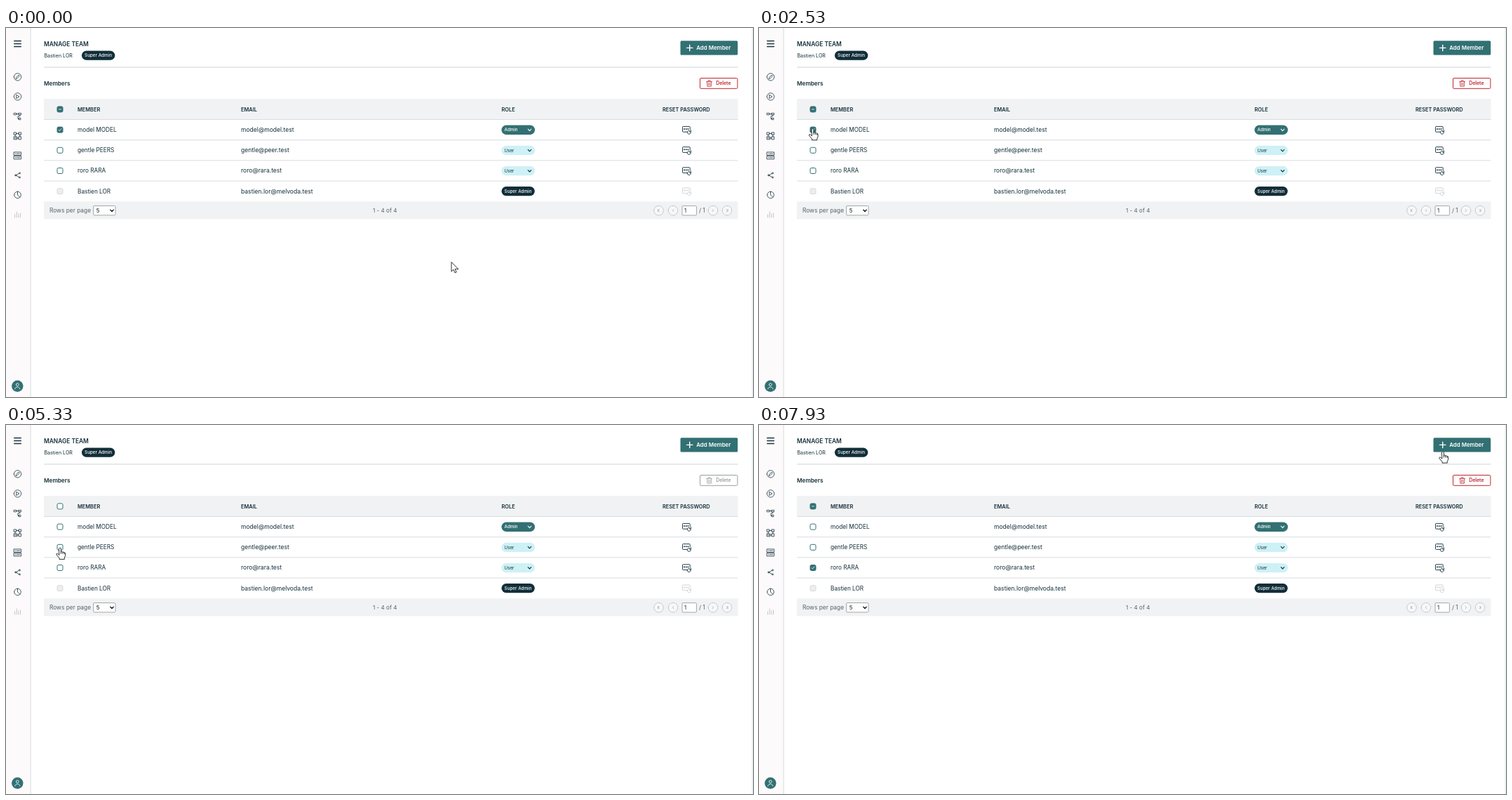
Animation of 1065 by 526 pixels, one loop 8 s. Source, as an HTML page:

```html
<!DOCTYPE html>
<html lang="en">
<head>
<meta charset="utf-8">
<title>Manage team</title>
<style>
html, body { margin: 0; width: 100%; height: 100%; overflow: hidden; background: #fff; }
svg { display: block; width: 1065px; height: 526px; }
text { font-family: Inter, "Open Sans", sans-serif; white-space: pre; }
.line { fill: none; stroke: #19343e; stroke-width: .8; stroke-linecap: round; stroke-linejoin: round; }
</style>
</head>
<body>
<svg id="stage" viewBox="0 0 1065 526"></svg>
<script>
const INK = '#14303a', TEAL = '#327073', NAVY = '#112e39', RED = '#bf2630', GREY = '#999c9e';
const stage = document.getElementById('stage');

const rect = (x, y, w, h, fill, r = 0, stroke = 'none') =>
  `<rect x="${x}" y="${y}" width="${w}" height="${h}" rx="${r}" fill="${fill}" stroke="${stroke}"/>`;
const text = (x, y, size, str, fill = INK, weight = 400) =>
  `<text x="${x}" y="${y}" font-size="${size}" fill="${fill}" font-weight="${weight}">${str}</text>`;
const icon = (x, y, d, extra = '') =>
  `<path class="line" transform="translate(${x} ${y})" d="${d}" style="${extra}"/>`;
const circle = r => `M${-r} 0a${r} ${r} 0 1 0 ${2 * r} 0a${r} ${r} 0 1 0 ${-2 * r} 0`;
const box = (x, y, w, h) => `M${x} ${y}h${w}v${h}h${-w}z`;

function sidebar() {
  const icons = [
    circle(5.2) + 'M-2.4 2.5L-1.9 .7 1.6-2.8 2.9-1.5-.6 2z',
    circle(5.2) + 'M-1.5-2.4L2.4 0-1.5 2.4z',
    box(-5, -4.5, 3.4, 2.4) + box(1.6, -4.5, 3.4, 2.4) + 'M-1.6-3.3H1.6M3.3-2.1V-.2H.5V3.6H2' + box(2, 2.4, 2.4, 2.4),
    box(-5, -5, 3.2, 3.2) + box(1.8, -5, 3.2, 3.2) + 'M-1.8-3.4H1.8M-3.3-1.8V1M3.3-1.8V1M-.7 3H1.8' +
      box(-5, 1, 4.2, 4) + box(1.8, 1, 3.2, 4) + 'M-4 3h2.2',
    box(-5, -5, 10, 4.4) + box(-5, .6, 10, 4.4) + 'M-3.4-2.8h1M-1-2.8h4.2M-3.4 2.8h1M-1 2.8h4.2',
    'M-2.6 0L2.4-2.7M-2.6 0L2.4 2.7M-3.7 0a1 1 0 1 0 2 0a1 1 0 1 0-2 0' +
      'M2-3a1 1 0 1 0 2 0a1 1 0 1 0-2 0M2 3a1 1 0 1 0 2 0a1 1 0 1 0-2 0',
    circle(4.8) + 'M0-4.8V0L3.2 3.2',
    'M-4 4V0M-1.3 4V-4M1.3 4V-1M4 4V-2'
  ];
  return rect(0, 0, 35, 526, '#fdfafb') + rect(34.6, 0, 1, 526, '#d5dadc') +
    icon(16.5, 22.5, 'M-4.8-4H4.8M-4.8 0H4.8M-4.8 4H4.8', 'stroke-width:1.4') +
    icons.map((d, i) => icon(16.5, 69.8 + 28.03 * i, d, i == 7 ? 'stroke:#b4b9bc' : '')).join('') +
    `<circle cx="16.3" cy="510.5" r="8.2" fill="${TEAL}"/>` +
    icon(16.3, 510.5, 'M-3.6 4.2C-3.6 .2 3.6 .2 3.6 4.2M-1.9-2.2a1.9 1.9 0 1 0 3.8 0a1.9 1.9 0 1 0-3.8 0', 'stroke:#fff');
}

function rolePill(y, role) {
  const admin = role == 'Admin', color = admin ? '#fff' : INK;
  return rect(706.5, y - 6.5, 47.5, 13.4, admin ? TEAL : '#cdf1f5', 6.7) +
    text(710.6, y + 2.3, 6.2, role, color, admin ? 500 : 400) +
    icon(746.5, y + .3, 'M-2.3-1.1L0 1.3 2.3-1.1', `stroke:${color};stroke-width:1.1`);
}

const superPill = (x, y) =>
  rect(x, y - 6.6, 47.3, 13.2, NAVY, 6.6) + text(x + 4.1, y + 2.1, 6.3, 'Super Admin', '#fff', 500);

const resetIcon = (y, on) => icon(970, y,
  'M1.5 3.2H-4.6Q-5.5 3.2-5.5 2.4V-3.8Q-5.5-4.6-4.6-4.6H4.3Q5.2-4.6 5.2-3.8V-.4' +
  'M-3.6-1h1.2M-.9-1h1.2M1.8-1H3M-3-1.6v1.2M-.3-1.6v1.2M2.4-1.6v1.2M6.2 2.8A2.5 2.5 0 1 1 4.6 1.3M6.4 .6V2.8H4.4',
  `stroke-width:.95;${on ? '' : 'stroke:#cfd2d4'}`);

const rows = [
  ['model MODEL', 'model@model.test', 'Admin'],
  ['gentle PEERS', 'gentle@peer.test', 'User'],
  ['roro RARA', 'roro@rara.test', 'User'],
  ['Bastien LOR', 'bastien.lor@melvoda.test', '']
];
const rowY = i => 145 + 29.2 * i;

function table() {
  let out = rect(54, 101, 989.5, 29.5, '#f1f2f4');
  [['MEMBER', 102], ['EMAIL', 335], ['ROLE', 706.5], ['RESET PASSWORD', 936]]
    .forEach(([label, x]) => out += text(x, 118.8, 7.4, label, INK, 600));
  rows.forEach(([name, mail, role], i) => {
    const y = rowY(i);
    out += rect(54, y - 15, 989.5, .9, '#d6dadc') + text(102, y + 3, 8.25, name) +
      text(335, y + 3, 8.55, mail) + (role ? rolePill(y, role) : superPill(706.5, y)) + resetIcon(y, role);
  });
  return out + rect(73, 228.7, 8, 8, '#ededee', 1.8, '#d8dadb');
}

function footer() {
  const ink = '#53646c', edge = '#a4a7a9';
  let out = rect(54, 247.3, 989.5, 25, '#f1f2f3') + text(62, 263, 8.35, 'Rows per page', ink) +
    rect(124.5, 253.5, 31.5, 13.4, '#fff', 1.5, edge) + text(128.7, 262.8, 7.6, '5', '#111') +
    icon(151, 260.4, 'M-2.2-1.1L0 1.1 2.2-1.1', 'stroke:#111;stroke-width:1.3') +
    text(523, 262.6, 8.1, '1 - 4 of 4', ink) +
    rect(964, 253.6, 20.4, 13.4, '#fff', 1, edge) + text(967, 262.8, 7.6, '1', '#111') +
    text(988, 263, 8.3, '/ 1', ink);
  const left = 'M1-1.7L-.7 0 1 1.7', right = 'M-1-1.7L.7 0-1 1.7';
  [[930.5, left + 'M-1-1.7V1.7'], [951, left], [1008, right], [1028, right + 'M1-1.7V1.7']]
    .forEach(([x, d]) => out += icon(x, 260.2, circle(6.8), 'stroke:#c6c9cc;fill:#f8f8f9;stroke-width:1') +
      icon(x, 260.2, d, 'stroke:#a5abae'));
  return out;
}

function page() {
  return sidebar() + rect(1063.6, 0, 1, 526, '#d3e5e7') +
    text(54, 26.2, 8.4, 'MANAGE TEAM', INK, 600) + text(54.4, 42, 7.1, 'Bastien LOR') + superPill(108, 39.2) +
    rect(961.5, 18.3, 81.7, 20.3, TEAL, 1.5) +
    icon(974.7, 28.4, 'M-4.2 0H4.2M0-4.2V4.2', 'stroke:#fff;stroke-width:1.4') +
    text(984.2, 31.2, 7.9, 'Add Member', '#fff', 600) +
    rect(54, 55.4, 989.5, 1, '#cfd5d8') + text(54, 81.6, 8.2, 'Members', INK, 600) + table() + footer();
}

function deleteButton(color) {
  return rect(989.5, 71.5, 53.4, 14.8, '#fff', 1.5, color) +
    icon(1002.6, 79, 'M-4-2.6H4M-1.4-2.8V-4.2H1.4V-2.8M-3.1-2.4L-2.7 4.2H2.7L3.1-2.4M-1-.6V2.5M1-.6V2.5', `stroke:${color}`) +
    text(1012.2, 81.3, 6.9, 'Delete', color, 600);
}

function checkbox(y, mark) {
  const on = mark != '';
  return rect(73, y - 3.9, 8, 8, on ? TEAL : '#fff', 1.8, TEAL) +
    (on ? icon(77, y + .1, mark == 'check' ? 'M-2 .1L-.6 1.6 2-1.6' : 'M-1.5 0H1.5', 'stroke:#fff') : '');
}

// Pointer path: [tick, x, y], 15 ticks per second
const keys = [
  [0, 635, 334], [1, 631, 332.5], [3, 631, 332.5], [13, 573.5, 310], [16, 394, 242], [29, 89, 147],
  [33, 75.5, 143], [37, 75.5, 143], [38, 76.5, 143], [59, 76.5, 143], [66, 77, 163],
  [72, 76, 174.6], [79, 76, 174.6], [80, 77, 174.6], [95, 77, 174.6], [103, 77.6, 204.8],
  [106, 77.6, 204.8], [112, 480, 120], [117, 980, 26], [119, 975, 37.3], [120, 975, 37.3]
];

// Monotone cubic interpolation of one coordinate
function along(tick, axis) {
  const i = Math.max(0, keys.findIndex(k => k[0] > tick) - 1);
  const slope = j => keys[j] && keys[j + 1]
    ? (keys[j + 1][axis] - keys[j][axis]) / (keys[j + 1][0] - keys[j][0]) : 0;
  const tangent = j => {
    const a = slope(j - 1), b = slope(j);
    return a * b > 0 ? 2 * a * b / (a + b) : 0;
  };
  const [a, b] = [keys[i], keys[i + 1]], span = b[0] - a[0], u = (tick - a[0]) / span;
  return a[axis] + (b[axis] - a[axis]) * u * u * (3 - 2 * u) +
    span * u * (1 - u) * (tangent(i) * (1 - u) - tangent(i + 1) * u);
}

const ARROW = 'M0 0V13.2L3 10.4 5.1 15 7.2 14 5.2 9.7H9.6Z';
const HAND = 'M-1.4 1.4Q0-.8 1.4 1.4V6Q2.8 5 3.8 6.6 5.4 5.8 6.1 7.4 7.6 6.8 7.6 9V12L6.3 14.4V16.8H-1V15' +
  'L-5 10.4Q-5.4 8-3.4 8.8L-1.4 10.6ZM1.4 6V8.6M3.8 6.8V8.8M6.1 7.6V9.2';

function pointer(tick) {
  const x = along(tick, 1), y = along(tick, 2);
  const overBox = x < 83 && [0, 1, 2].some(i => Math.abs(y - rowY(i)) < 5);
  const overAdd = x > 961 && y < 39;
  return icon(x, y, overBox || overAdd ? HAND : ARROW, 'fill:#fff;stroke:#16191c;stroke-width:.9');
}

stage.innerHTML = page() + '<g id="live"></g>';
const live = document.getElementById('live');

function draw() {
  const tick = Math.floor((performance.now() % 8000 + 4) * .015);
  const chosen = tick < 60 ? 0 : tick < 107 ? -1 : 2;
  live.innerHTML = deleteButton(chosen < 0 ? GREY : RED) + checkbox(115.8, chosen < 0 ? '' : 'dash') +
    [0, 1, 2].map(i => checkbox(rowY(i), i == chosen ? 'check' : '')).join('') + pointer(Math.min(tick, 119));
  requestAnimationFrame(draw);
}
draw();
</script>
</body>
</html>
```
